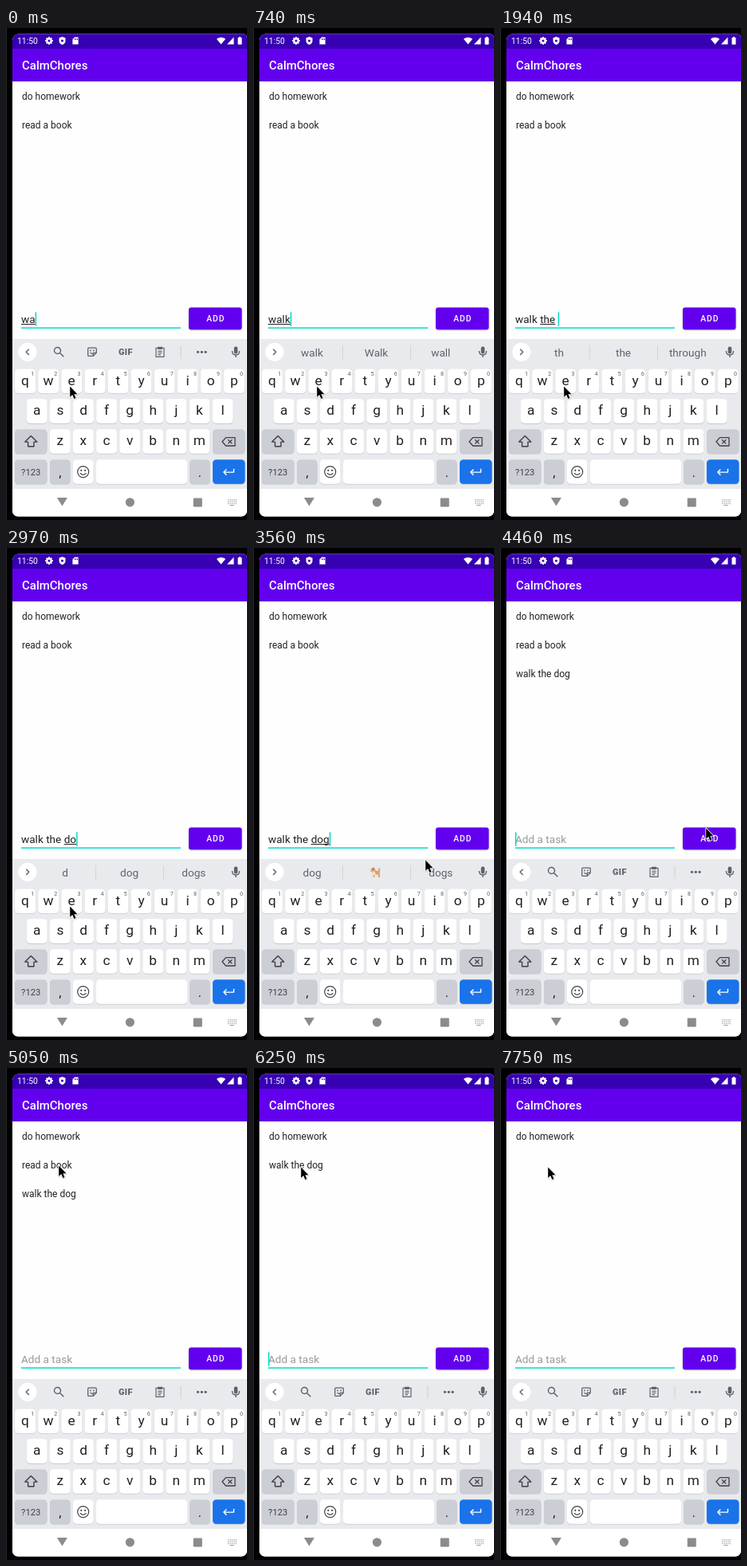
Recreate the animation shown at these times as an HTML page with a canvas. Size 302 by 617 pixels, loop 8 s.

```html
<!DOCTYPE html>
<html lang="en">
<head>
<meta charset="utf-8">
<title>To-do list</title>
<style>
html, body { margin: 0; width: 100%; height: 100%; overflow: hidden; background: #000; }
canvas { display: block; width: 302px; height: 617px; }
</style>
</head>
<body>
<canvas id="stage"></canvas>
<script>
const W = 302, H = 617, LOOP = 8000;
const canvas = document.getElementById('stage');
const c = canvas.getContext('2d');
const ratio = window.devicePixelRatio || 1;
canvas.width = W * ratio;
canvas.height = H * ratio;

const INK = '#202124', GREY = '#5f6368', PURPLE = '#6200ee', TEAL = '#03dac5';

// Each step changes part of the state: typed text, composing word,
// suggestions (null shows the toolbar), caret, pointer, ripple and list.
const steps = [
  [0, { done: '', word: 'wa', strip: null, caret: true, pointer: [79, 448], ripple: 0,
        items: ['do homework', 'read a book'] }],
  [150, { strip: ['wa', 'was', 'want'], caret: false }],
  [450, { word: 'wal', caret: true }],
  [590, { word: 'walk', strip: ['wal', 'walk', 'walking'] }],
  [740, { strip: ['walk', 'Walk', 'wall'] }],
  [1040, { tail: ' ' }],
  [1190, { done: 'walk ', word: '', tail: '', strip: ['to', 'in', 'the'] }],
  [1490, { word: 't' }],
  [1640, { word: 'th', strip: ['t', 'the', 'to'] }],
  [1790, { word: 'the', strip: ['th', 'the', 'through'] }],
  [1940, { tail: ' ' }],
  [2080, { done: 'walk the ', word: '', tail: '' }],
  [2230, { strip: ['first', 'dog', 'best'] }],
  [2670, { caret: false }],
  [2820, { word: 'd', caret: true, strip: ['d', 'dog', 'dogs'] }],
  [2970, { word: 'do' }],
  [3110, { word: 'dog', strip: ['do', 'dog', 'dogs'] }],
  [3260, { strip: ['dog', '*', 'dogs'] }],
  [3410, { pointer: [130, 434] }],
  [3560, { pointer: [215, 390] }],
  [3710, { pointer: [256, 367] }],
  [3860, { pointer: [262, 362], caret: false }],
  [4010, { ripple: 0.5 }],
  [4160, { ripple: 1 }],
  [4310, { done: '', word: '', caret: true, ripple: 0.9, items: ['do homework', 'read a book', 'walk the dog'] }],
  [4460, { strip: null, ripple: 0, pointer: [257, 350] }],
  [4610, { pointer: [195, 245] }],
  [4760, { pointer: [101, 140], caret: false }],
  [4910, { pointer: [76, 113] }],
  [5050, { pointer: [65, 121] }],
  [5200, { pointer: [59, 123], caret: true }],
  [5650, { caret: false }],
  [5800, { items: ['do homework', 'walk the dog'] }],
  [6250, { caret: true }],
  [6700, { caret: false }],
  [6850, { items: ['do homework'] }],
  [7150, { caret: true }],
  [7750, { caret: false }]
];

const stateAt = t => Object.assign({ tail: '' }, ...steps.filter(s => s[0] <= t).map(s => s[1]));

function text(str, x, y, size, color, align = 'left', weight = 400) {
  c.font = `${weight} ${size}px Roboto, sans-serif`;
  c.textAlign = align;
  c.fillStyle = color;
  c.fillText(str, x, y);
  return c.measureText(str).width;
}
function rect(x, y, w, h, color) {
  c.fillStyle = color;
  c.fillRect(x, y, w, h);
}
function box(x, y, w, h, r, color) {
  c.beginPath();
  c.roundRect(x, y, w, h, r);
  c.fillStyle = color;
  c.fill();
}
function disc(x, y, r, color) {
  c.beginPath();
  c.arc(x, y, r, 0, 7);
  c.fillStyle = color;
  c.fill();
}
// SVG path drawn at (x, y); a line width makes it an outline.
function icon(d, x, y, color, line) {
  const p = new Path2D(d);
  c.save();
  c.translate(x, y);
  c.lineJoin = 'round';
  if (line) {
    c.lineWidth = line;
    c.strokeStyle = color;
    c.stroke(p);
  } else {
    c.fillStyle = color;
    c.fill(p, 'evenodd');
  }
  c.restore();
}

function statusBar() {
  rect(8, 7, 294, 19, '#3700b3');
  text('11:50', 14, 20, 10.4, '#fff');
  for (let i = 0; i < 8; i++) {
    c.save();
    c.translate(54, 16);
    c.rotate(i * Math.PI / 4);
    rect(-1, -4.8, 2, 3, '#fff');
    c.restore();
  }
  disc(54, 16, 3.7, '#fff');
  disc(54, 16, 1.5, '#3700b3');
  icon('M0-5L4-3.4V0Q4 3.5 0 5Q-4 3.5-4 0V-3.4Z', 70.5, 16, '#fff');
  disc(70.5, 16, 1.6, '#3700b3');
  icon('M-1-4.5H3.6V4.5H-3.6V-1.8Z M-1.3-3V-1H-.5V-3Z M.4-3V-1H1.2V-3Z M2-3V-1H2.8V-3Z', 87, 16, '#fff');
  icon('M0 4.5L-5.6-2.2Q0-6.4 5.6-2.2Z', 269.5, 16, '#fff');
  icon('M4 4.5H-4.5L4-4.5Z', 281.5, 16, '#fff');
  box(290.5, 12, 5, 8.8, .7, '#fff');
  rect(292, 11, 2, 2, '#fff');
}

function addButton(ripple) {
  const shape = [229, 350.5, 66.5, 27.8, 3];
  c.save();
  c.shadowColor = 'rgba(0,0,0,.3)';
  c.shadowBlur = (ripple ? 5 : 2) * ratio;
  c.shadowOffsetY = (ripple ? 2 : .8) * ratio;
  box(...shape, PURPLE);
  c.restore();
  if (ripple) {
    c.save();
    c.beginPath();
    c.roundRect(...shape);
    c.clip();
    rect(229, 350, 67, 29, 'rgba(255,255,255,.08)');
    disc(262, 364, 45 * ripple, 'rgba(255,255,255,.16)');
    c.restore();
  }
  c.letterSpacing = '0.9px';
  text('ADD', 262.8, 368.4, 10.3, '#fff', 'center', 500);
  c.letterSpacing = '0px';
}

function field(s) {
  rect(19, 375.4, 200, 1.5, TEAL);
  let x = 19;
  if (!s.done && !s.word) text('Add a task', x, 370, 13.6, '#9a9a9a');
  x += text(s.done, x, 370, 13.6, INK);
  const w = text(s.word, x, 370, 13.6, INK);
  if (w) rect(x, 371, w, 1, INK);
  x += w + c.measureText(s.tail).width;
  if (s.caret) rect(x, 356.3, 1.5, 17.5, TEAL);
}

function dog(x, y) {
  icon('M-6-2.5Q-5-6.5-2-6Q0-5 0-2L4-1.5Q2.5-5 5-5.5Q6.5-3 5.3 1L5.5 6.5H3.5L3 3H-1V6.5H-3V2Q-4-.5-6-1Z', x, y, '#dda272');
  icon('M-3.5-1.5Q-.5-1 0 1.5L-1 4H-2.8Z', x, y, '#f6e3cf');
  disc(x - 3, y - 3.6, .7, '#4a2c1a');
}

function strip(words) {
  disc(27, 406.3, 11.5, '#fff');
  icon(words ? 'M-1.8-3.6L1.8 0L-1.8 3.6' : 'M1.8-3.6L-1.8 0L1.8 3.6', 27, 406.3, GREY, 1.4);
  box(285.7, 399.5, 4.6, 9, 2.3, GREY);
  icon('M-4.6-1Q-4.6 4 0 4Q4.6 4 4.6-1M0 4V7', 288, 406, GREY, 1.4);
  if (words) {
    [112, 197].forEach(x => rect(x, 398, 1, 18, '#d2d4d8'));
    words.forEach((word, i) => {
      const x = [74, 154.5, 235.3][i];
      if (word === '*') dog(x - 1, 406.5);
      else text(word, x, 411.8, 13.6, GREY, 'center');
    });
    return;
  }
  icon('M2.2-1.5A4 4 0 1 1-5.8-1.5A4 4 0 1 1 2.2-1.5M1.2 1.5L6 6.3', 66.3, 406, GREY, 1.5);
  icon('M-4.2-5H4.2Q5.3-5 5.3-4V1.2L1.3 5.2H-4.2Q-5.3 5.2-5.3 4.2V-4Q-5.3-5-4.2-5M1.3 5V1.2H5.2M-2.5 .8Q-1.5 2.5 .5 2', 108, 406.2, GREY, 1.3);
  disc(106, 404.5, .9, GREY);
  disc(110, 404.5, .9, GREY);
  c.letterSpacing = '0.5px';
  text('GIF', 150, 410.2, 10.8, GREY, 'center', 900);
  c.letterSpacing = '0px';
  icon('M-5-5H5V6H-5ZM-2.5-1H2.5M-2.5 1.2H2.5M-2.5 3.4H1', 193, 406.3, GREY, 1.2);
  rect(190.2, 399.8, 5.6, 3.2, GREY);
  rect(218.5, 398.5, 1, 16, '#ccced2');
  [240.5, 245.3, 250.1].forEach(x => disc(x, 406.3, 1.6, GREY));
}

function key(x, y, w, color = '#fff') {
  box(x, y + .9, w, 30.5, 4.5, '#c3c6cb');
  box(x, y, w, 30.5, 4.5, color);
}

function keyboard() {
  const rows = [['qwertyuiop', 24, 427.7], ['asdfghjkl', 38.8, 465.3], ['zxcvbnm', 67.8, 503.2]];
  rows.forEach(([letters, start, y], row) => {
    [...letters].forEach((letter, i) => {
      const x = start + i * 29.1;
      key(x - 12.9, y, 25.8);
      text(letter, x, y + 20, 17.3, INK, 'center');
      if (row === 0) text((i + 1) % 10, x + 9.2, y + 8.3, 7.2, GREY, 'center');
    });
  });
  const special = '#ccced5';
  key(11, 503.2, 40.5, special);
  icon('M0-7.2L7.5 .4H3.7V6H-3.7V.4H-7.5Z', 31.3, 518.7, '#3c4043', 1.4);
  key(259, 503.2, 40.5, special);
  icon('M-3.5-5.2H8V5.2H-3.5L-8 0ZM-.8-2.6L4.4 2.6M4.4-2.6L-.8 2.6', 279, 518.8, '#3c4043', 1.3);

  const bottom = 541.2;
  key(11, bottom, 40.5, special);
  text('?123', 31.2, 561, 11.2, '#3c4043', 'center');
  key(55, bottom, 25.6, special);
  text(',', 67.8, 562.5, 16, INK, 'center');
  key(84, bottom, 25.6);
  icon('M7 0A7 7 0 1 1-7 0A7 7 0 1 1 7 0M-3.7 1.6Q0 6 3.7 1.6', 96.7, 556.6, '#3c4043', 1.2);
  disc(94.3, 554.8, 1.1, '#3c4043');
  disc(99.1, 554.8, 1.1, '#3c4043');
  key(113, bottom, 114);
  key(230, bottom, 25.6, special);
  text('.', 242.8, 562.5, 16, INK, 'center');
  key(259, bottom, 40.5, '#1a73e8');
  icon('M6.5-3.8V.6H-6M-2.6-3L-6.2 .6L-2.6 4.2', 279, 556.5, '#fff', 1.4);
}

function navBar() {
  rect(8, 578, 294, 36, '#fff');
  const grey = '#8b8b8b';
  icon('M-6.5-5H6.5L0 5.5Z', 70.4, 594, grey);
  disc(155.4, 594.8, 5.6, grey);
  box(234.8, 589.5, 11, 11, 1, grey);
  for (let row = 0; row < 3; row++)
    for (let i = 0; i < 5; i++)
      rect(278 + i * 2.4, 591 + row * 2.4, 1.3, 1.3, '#a4a4a4');
  rect(280.5, 598, 5, 1.2, '#a4a4a4');
}

function pointer([x, y]) {
  const arrow = 'M0 0V13.2L3 10.4L5.2 15.4L7.3 14.4L5.2 9.6H9.3Z';
  icon(arrow, x + 1.6, y + 2.2, 'rgba(0,0,0,.15)', 2);
  icon(arrow, x + 1.2, y + 1.6, '#fff', 1.6);
  icon(arrow, x + 1.2, y + 1.6, '#000');
}

function draw(t) {
  const s = stateAt(t);
  c.setTransform(ratio, 0, 0, ratio, 0, 0);
  rect(0, 0, W, H, '#000');
  rect(0, 0, 1, H, '#2a2a2a');
  c.save();
  c.beginPath();
  c.roundRect(8, 7.4, 294, 605.1, [8, 5, 7, 7]);
  c.clip();
  rect(8, 7, 294, 607, '#fefefe');
  statusBar();
  rect(8, 26, 294, 41, PURPLE);
  text('CalmChores', 20, 52, 15, '#fff', 'left', 500);
  s.items.forEach((item, i) => text(item, 20, 89.8 + i * 36, 12, INK));
  field(s);
  addButton(s.ripple);
  rect(8, 390, 294, 188, '#e8eaed');
  strip(s.strip);
  keyboard();
  navBar();
  c.restore();
  pointer(s.pointer);
}

const start = performance.now();
function tick() {
  draw((performance.now() - start) % LOOP);
  requestAnimationFrame(tick);
}
tick();
</script>
</body>
</html>
```
